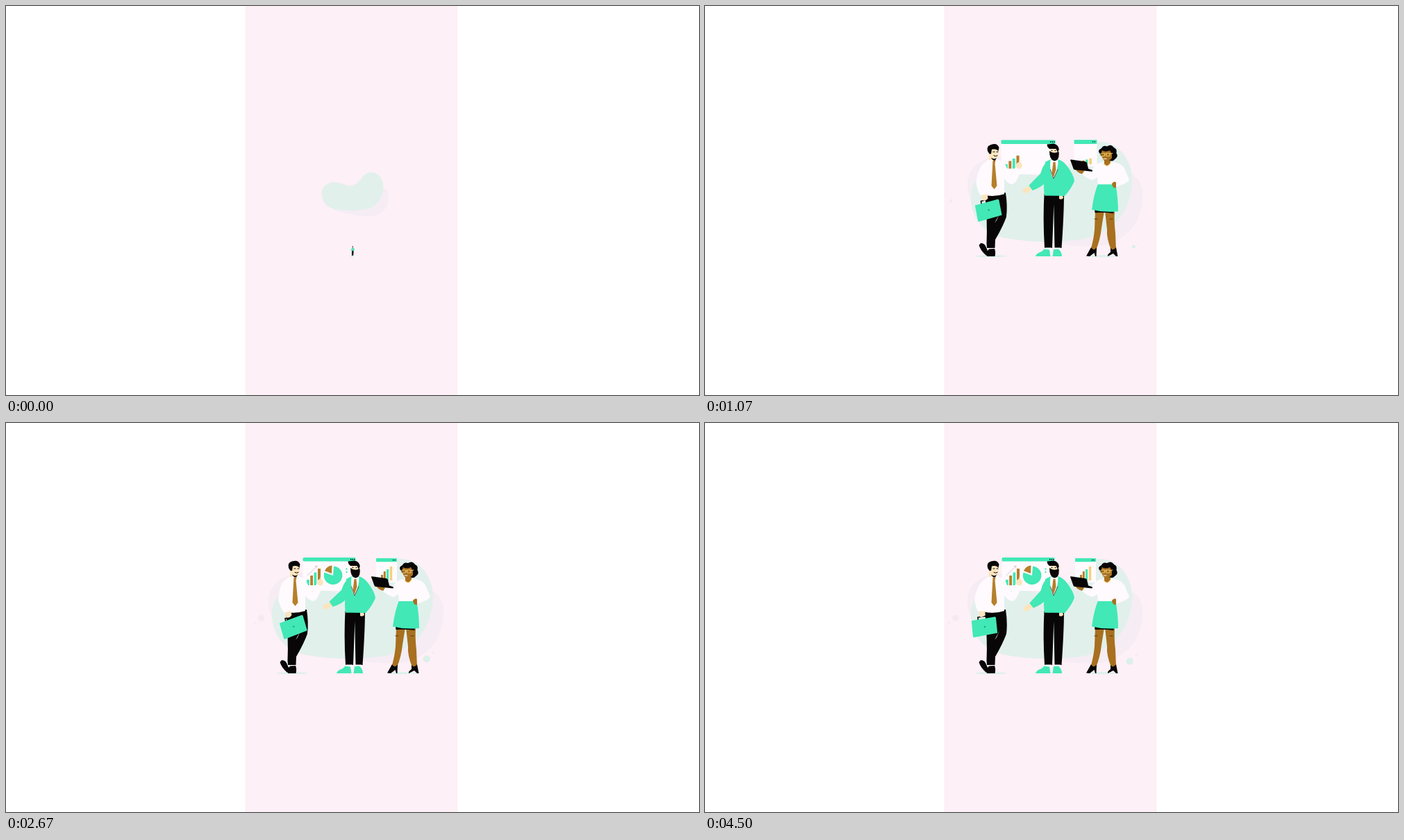
Recreate the animation shown at these times as an HTML page. Size 998 by 561 pixels, loop 4530 ms.

```html
<!DOCTYPE html>
<html lang="en">
<head>
<meta charset="utf-8">
<title>Team presentation</title>
<style>
  html, body { margin: 0; width: 100%; height: 100%; overflow: hidden; background: #fff; }
  svg { display: block; width: 100%; height: 100%; }
  .green { fill: #42e8b6; }
  .brown { fill: #b57f2c; }
  .dark { fill: #080606; }
  .white { fill: #fffafd; }
  .pale { fill: #fce5bd; }
  .skin { fill: #a8701f; }
  .mint { fill: #dbf0ea; }
  .line { fill: none; stroke-linecap: round; stroke-linejoin: round; }
</style>
</head>
<body>
<svg viewBox="0 0 998 561">
  <path fill="#fdf0f6" d="M344.5 0h306v561h-306z"/>

  <path id="backBlob" fill="#f5ecf4" d="M427 217C455 217 470 235 500 238C540 240 560 235 590 236C615 236 630 250 630 272C630 310 610 335 575 345C545 350 500 342 470 335C410 325 378 290 378 258C378 232 400 217 427 217Z"/>
  <path id="frontBlob" fill="#e2f0ec" d="M569 196C596 196 615 222 615 250C614 300 585 328 545 336C500 343 455 340 425 333C395 323 383 300 383 276C383 248 405 234 430 234C460 234 465 246 490 246C532 246 530 196 569 196Z"/>

  <g id="leftDot" fill="#f4eaf1"><circle r="4.5"/><circle cx="-9" cy="7" r="1.5"/></g>
  <g id="rightDot" class="mint"><circle r="5"/><circle cx="9" cy="-9" r="1.5" fill="#f2e9f1"/></g>

  <g id="board">
    <path class="white" d="M427.5 196h76v46h-76z"/>
    <rect class="green" x="427.5" y="194" width="76" height="5.5" rx="1.5"/>
    <path class="dark" d="M496 196h1.4v1.4h-1.4zM498.5 196h1.4v1.4h-1.4zM501 196h1.4v1.4h-1.4z"/>
    <g id="bars">
      <path class="green" d="M433 226h3.8v8H433zM443.5 215.500h3.800V234h-3.800z"/>
      <path class="brown" d="M438.200 220h3.800v14h-3.800zM449 210h4v24h-4z"/>
    </g>
    <path id="trend" class="line" stroke="#c9c4c4" stroke-width=".8" d="M434 220L448 206M445 206.500L448 206L447.500 209"/>
    <g id="pie">
      <path class="green" d="M471 220L472 206.500A13.300 13.300 0 1 1 458.500 215.500Z"/>
      <path class="brown" d="M469 217L459 213.200Q461.500 206.500 469.500 205.500Z"/>
      <path class="green" d="M489.500 209.500h2v2h-2zM489.500 214h2v2h-2z"/>
    </g>
  </g>

  <g id="miniBoard">
    <path class="white" d="M533 196h30v34h-30z"/>
    <rect class="green" x="533" y="195" width="30" height="5.300" rx="1"/>
    <path class="dark" d="M557 197h1.200v1.200h-1.200zM559.500 197h1.200v1.200h-1.200z"/>
    <g id="miniBars">
      <path class="brown" d="M540 219h3v8h-3zM543.800 214h3v13h-3z"/>
      <path class="green" d="M548 211h3.200v16H548z"/>
      <path fill="#f5cf7c" d="M552.800 207h3.400v20h-3.400z"/>
    </g>
  </g>

  <g id="middle">
    <path class="dark" d="M488.500 271L517 271Q517 300 513.500 349H503.500L502.300 286L500 349H489Q486.500 310 488.500 271Z"/>
    <path class="white" d="M489.500 348.500h9.500v3h-9.500zM503 348.500h9v3h-9z"/>
    <path class="green" d="M476 361Q477 356.500 485 354L488.500 350.500L496 351.500L497.500 361ZM500.500 361L502 351L509 350.500Q514 355 514 361Z"/>
    <path class="pale" d="M510 272q6 0 6 5q-3 3-6 1z"/>
    <path class="green" d="M490 225L498 221H508Q515 223 520 229Q531 243 532 252Q528 263 518 274L489 273.500Q487 262 489 250Z"/>
    <g id="reach">
      <path class="pale" d="M468 257L458 262Q454 264 457 265.500L455.500 267.500Q459 270 465 267L471 262Z"/>
      <path class="green" d="M495 224Q488 226 483 241L465.500 257.500L470.500 265Q487 260 494 249Z"/>
    </g>
    <path class="white" d="M497.500 221.500L508.500 221.500Q509 235 502 249Q495.500 240 497.500 221.500Z"/>
    <path class="brown" d="M501.500 225h3l1 11-3.500 11-2.500-6z"/>
    <path class="line" stroke="#4d3b24" stroke-width=".8" d="M497.500 236L502 249L508 236"/>
    <path class="pale" d="M497 204h12v11h-12z"/>
    <path class="dark" d="M496 209Q502 214 509.500 210Q511 223 503 223.500Q496 222 496 209ZM492.500 199.500Q498 199 502 198.500Q509 199.500 509.800 207L508 211L505.500 206L496 206Q493 204 492.500 199.500Z"/>
    <circle cx="499.500" cy="208.500" r=".8"/><circle cx="504.500" cy="208.500" r=".8"/>
  </g>

  <g id="left">
    <ellipse class="mint" cx="412" cy="360.800" rx="23" ry="1.500"/>
    <path class="white" d="M404.500 344h12.500v8h-12.500z"/>
    <path class="dark" d="M403 270L433 269Q436 288 434 304Q429 318 418 337L417.500 349L406 349L405.500 343Q407 310 403 270ZM397 342Q402 342 404 346Q407 351 408 358L405 360Q397 353 394.500 345ZM406 361Q405 354 409 350.500L417 350Q419 355 417.500 361Z"/>
    <path fill="#fdf0f6" d="M417 313L424 300L420 309Z"/>
    <path class="white" d="M410 221H422Q432 224 435 234L441 244L449 229L456 232Q450 256 442 257Q435 255 431 249V271Q415 276 400 272Q401 250 397 238Q400 224 410 221Z"/>
    <path class="pale" d="M448 231Q448 226 452 225L453 221L455 226Q459 229 455 234Q450 236 448 231Z"/>
    <path class="brown" d="M414.500 222.500h4L417.500 227L420.500 259L416.500 264L412.500 259Z"/>
    <path class="pale" d="M409 205H422.500V217Q419 222 413 219.500V222H409Z"/>
    <path class="dark" d="M407 209Q405 201 412 199.500Q421 196.500 423.500 204L422.500 209Q420 205 413 206.500L412 213L409.500 213ZM412 218.500Q417 222 420 218.500L418 222.500Q414 223 412 218.500Z"/>
    <path class="line" stroke="#080606" stroke-width="1" d="M415 210h2M420 210h2M416 215.500q3 1.500 5 0"/>
    <g id="swing">
      <path class="dark line" stroke="#080606" stroke-width="1.600" d="M399 286L398 281.500L409 278.500L411 282.500"/>
      <path class="green" d="M389.500 287.500L422 278.300Q423.500 278 424 279.500L428.500 301L395.500 311Q394.500 311 394 310Z"/>
      <circle cx="409.500" cy="294" r="1.200" fill="#259f7c"/>
      <path class="pale" d="M399 270h8l1 7q-3 5-8 3z"/>
      <path class="white" d="M402 226Q394 232 391 250Q389.500 259 397 273L409 271Q404 258 408 240Z"/>
    </g>
  </g>

  <g id="right">
    <ellipse class="mint" cx="573" cy="360.800" rx="23" ry="1.500"/>
    <path class="skin" d="M562 295H575L571 320Q569 338 563 352L555.500 351Q560 335 561 322ZM576 295H590Q589 310 591 327L592 351L585 352Q578 335 579 322Z"/>
    <path class="dark" d="M561 293H588.500V299Q575 297 561.500 298ZM549 360.500L556 348Q559 354 564 348.500L563.500 361H562L560.500 356L554 361ZM584 349Q588 354 592 348L594.500 361H592L588 357L580 361Q579 358.500 584 355Z"/>
    <path class="line" stroke="#5d3c0e" stroke-width="1" d="M561 307h4M583 307h4"/>
    <path class="green" d="M566.500 255H591Q595 276 595 296Q575 298 557 293.500Q560 270 566.500 255Z"/>
    <path class="white" d="M572 225H587Q600 226 604 234L611 250Q610 255 591 261V257H566L565 247L558 251Q548 248 541 240L545 235L556 238Q562 226 572 225Z"/>
    <path class="skin" d="M586 256q3-4 6-2v8q-5 1-6-6zM533 234Q540 232 546 238L543 242Q535 240 533 234ZM575 218h9v7q-4 9-9 2z"/>
    <path class="line" stroke="#f0c14e" stroke-width="1" d="M574 227q5 7 10-1"/>
    <path class="dark" d="M526 222Q526 221 527 221.200L547 224Q549 224 550 226L552 234.500L558 236.500L557.500 238.500L533 236Q531 236 530.500 234.500Z"/>
    <path class="dark" d="M569 213Q564 208 571 205Q573 200 579 202Q585 198 589 204Q594 206 592.500 212Q596 217 590 221Q587 225 582 222L570 216Z"/>
    <path class="skin" d="M571.500 208Q577 211 583 208L586 213V219Q580 226 574 222Q570 217 571.500 208Z"/>
    <path class="line" stroke="#f2cf72" stroke-width=".9" d="M570.500 212h5v4h-5zM578 212h5v4h-5zM575.500 213.500h2.500M583 213l4-1"/>
    <path class="line" stroke="#fff" stroke-width="1" d="M574 220h4"/>
  </g>
</svg>
<script>
const LOOP = 4530, TAU = 2 * Math.PI;
const el = id => document.getElementById(id);
const clamp = x => Math.min(1, Math.max(0, x));
const progress = (t, from, to) => clamp((t - from) / (to - from));
const easeOut = p => 1 - (1 - p) ** 2;
const easeInOut = p => p < .5 ? 2 * p * p : 1 - 2 * (1 - p) ** 2;
const easeSine = p => (1 - Math.cos(Math.PI * p)) / 2;
const wave = (t, peak) => Math.cos(TAU * (t - peak) / 4500);

// Blend smoothly through [time, value] extremes.
function follow(t, keys) {
  let value = keys[0][1];
  for (let i = 1; i < keys.length; i++) {
    const [t0, v0] = keys[i - 1], [t1, v1] = keys[i];
    if (t >= t0) value = v0 + (v1 - v0) * easeSine(progress(t, t0, t1));
  }
  return value;
}

const place = (id, transform) => el(id).setAttribute('transform', transform);
const scale = (id, x, y, sx, sy = sx, dx = 0, dy = 0) =>
  place(id, `translate(${x + dx} ${y + dy}) scale(${sx} ${sy}) translate(${-x} ${-y})`);
const rotate = (id, angle, x, y) => place(id, `rotate(${angle} ${x} ${y})`);

function draw(t) {
  const grow = easeOut(progress(t, 0, 500));
  const blob = .38 + .62 * grow;
  scale('frontBlob', 499, 267, blob);
  scale('backBlob', 499, 267, blob, blob, 2 * (1 - grow), 6 * (1 - grow));

  scale('middle', 499, 361, .09 + .91 * easeInOut(progress(t, 0, 780)));
  const side = easeOut(progress(t, 310, 1110));
  scale('left', 411, 361, side);
  scale('right', 574, 361, side);

  scale('board', 465.5, 218.5, follow(t, [[260, 0], [850, 1.1], [1480, .85], [2130, 1.07], [2600, 1]]));
  scale('miniBoard', 548, 214, follow(t, [[420, 0], [1070, 1.1], [1470, .8], [2100, 1.05], [2500, 1]]));
  scale('bars', 433, 234, 1, easeSine(progress(t, 600, 1300)));
  scale('miniBars', 540, 227, 1, easeSine(progress(t, 750, 1500)));
  scale('pie', 471, 220, follow(t, [[1500, 0], [1950, 1.1], [2300, .97], [2550, 1]]));
  el('trend').style.opacity = progress(t, 1500, 1900);

  const sway = .3 - 5.7 * wave(t, 2250);
  rotate('swing', sway, 407, 232);
  rotate('reach', -.4 * (sway + 5), 495, 235);

  const pop = easeOut(progress(t, 950, 1350)), drift = wave(t, 3250);
  place('leftDot', `translate(${362 + 8 * drift} 281) scale(${pop})`);
  place('rightDot', `translate(${610.5 - 7 * drift} ${343 - 4 * drift}) scale(${pop})`);
}

function tick() {
  draw(performance.now() % LOOP);
  requestAnimationFrame(tick);
}
tick();
</script>
</body>
</html>
```
